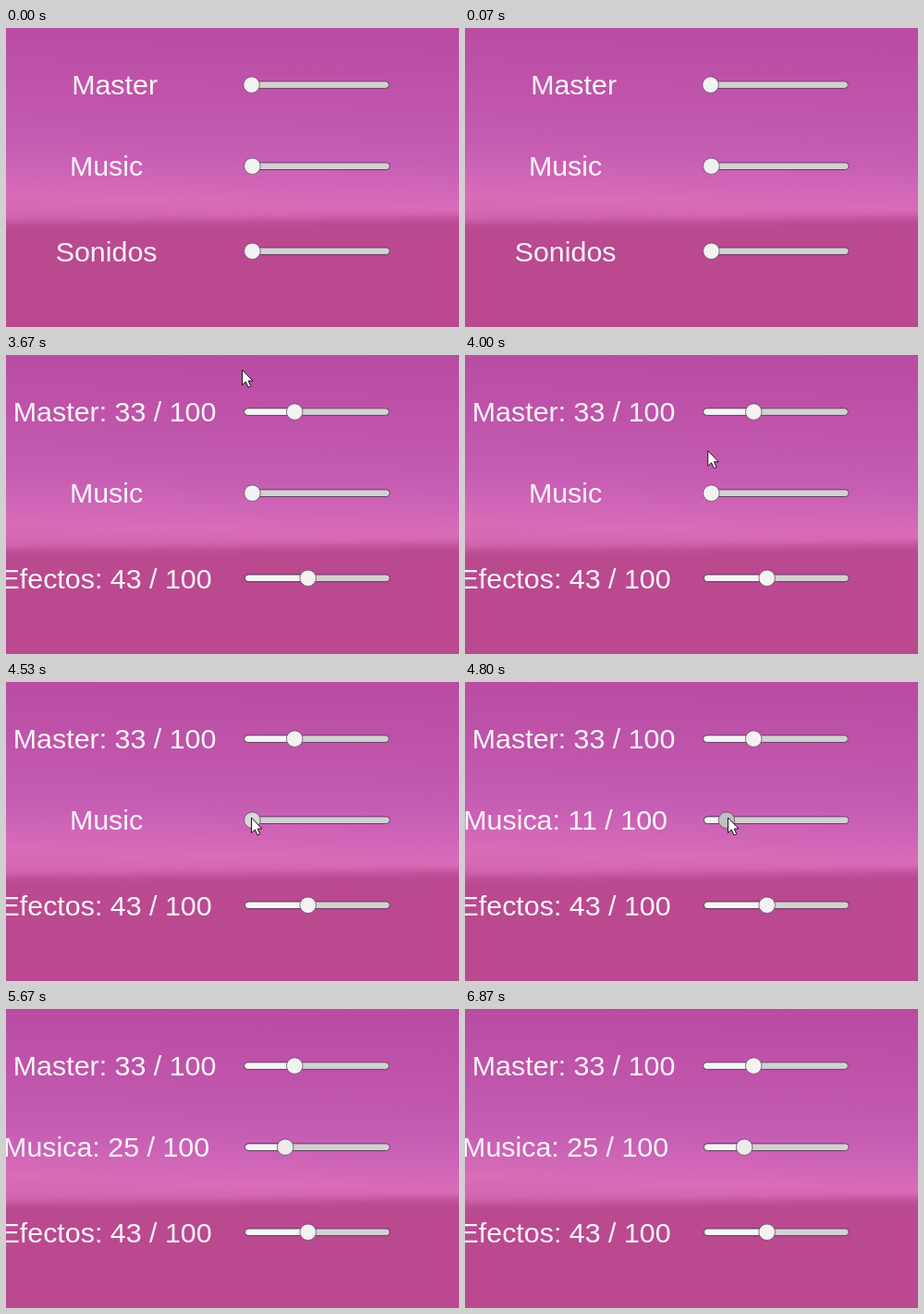
Recreate the animation shown at these times as an HTML page. Size 490 px wide and 324 px high, loop 8 s.

```html
<!DOCTYPE html>
<html lang="es">
<head>
<meta charset="utf-8">
<title>Volumen</title>
<style>
  html, body { margin: 0; width: 100%; height: 100%; overflow: hidden; background: #ba4990; }
  svg { display: block; width: 490px; height: 324px; }
  text { font: 30.4px "Liberation Sans", Arial, sans-serif; fill: #fdf5fb; text-anchor: middle; white-space: pre; }
  .track { fill: #d3d1d3; stroke: #653c60; }
  .fill { fill: #f6f4f6; stroke: #653c60; }
  .knob { fill: #f2f2f2; stroke: #6d4a69; stroke-width: .8; }
</style>
</head>
<body>
<svg id="stage" viewBox="0 0 490 324">
  <defs>
    <linearGradient id="sky" gradientUnits="userSpaceOnUse" x1="245" y1="0" x2="239" y2="205">
      <stop offset="0" stop-color="#b94ca2"/>
      <stop offset=".36" stop-color="#bf54aa"/>
      <stop offset=".66" stop-color="#c55db3"/>
      <stop offset=".8" stop-color="#cf65b7"/>
      <stop offset=".92" stop-color="#da6cb8"/>
      <stop offset="1" stop-color="#d468b3"/>
    </linearGradient>
    <filter id="soft" x="-10%" y="-20%" width="120%" height="140%">
      <feGaussianBlur stdDeviation="0 5"/>
    </filter>
  </defs>
  <rect width="490" height="324" fill="url(#sky)"/>
  <path d="M-30 210Q245 209 520 204V360H-30Z" fill="#ba4990" filter="url(#soft)"/>
  <g id="rows"></g>
  <path id="cursor" d="M.5 0V16.5L4.3 13L7 19L9.8 17.8L7.2 12H12Z" fill="#fff" stroke="#1c1018" stroke-linejoin="round"/>
</svg>
<script>
const LOOP = 8000, FPS = 15, SPAN = 139.5;
const el = id => document.getElementById(id);

function add(parent, tag, attrs) {
  const node = document.createElementNS("http://www.w3.org/2000/svg", tag);
  for (const key in attrs) node.setAttribute(key, attrs[key]);
  return parent.appendChild(node);
}

function makeRow(textX, baseline, knobX, y) {
  const rows = el("rows");
  const bar = { x: knobX - 8, y: y - 3.8, height: 7.6, rx: 3.8 };
  const label = add(rows, "text", { x: textX, y: baseline });
  add(rows, "rect", { ...bar, width: 156.8, class: "track" });
  const fill = add(rows, "rect", { ...bar, class: "fill" });
  const knob = add(rows, "circle", { cy: y, r: 8.8, class: "knob" });
  return (value, idle, active, shade = 242) => {
    const x = knobX + value / 100 * SPAN;
    const text = value > 0 ? `${active}: ${Math.floor(value)} / 100` : idle;
    if (label.textContent !== text) label.textContent = text;
    fill.setAttribute("width", x - knobX + 8);
    knob.setAttribute("cx", x);
    knob.style.fill = `rgb(${shade},${shade},${shade})`;
  };
}

const master = makeRow(117.6, 72.3, 265.6, 61.6);
const music = makeRow(108.6, 160.4, 266.4, 149.7);
const effects = makeRow(108.6, 252.5, 266.4, 241.8);

// Keys are [tick, ...values], interpolated linearly and held at the ends.
function at(keys, tick) {
  if (tick <= keys[0][0]) return keys[0].slice(1);
  for (let i = 1; i < keys.length; i++) {
    const [a, b] = [keys[i - 1], keys[i]];
    if (tick <= b[0]) {
      const p = (tick - a[0]) / (b[0] - a[0]);
      return a.slice(1).map((v, j) => v + (b[j + 1] - v) * p);
    }
  }
  return keys[keys.length - 1].slice(1);
}

const dragKeys = [[68, 0], [72, 11.8], [78, 24.4], [79, 25.6]];
const shadeKeys = [[62, 242], [63, 235], [67, 235], [68, 216], [69, 192], [80, 192], [82, 235]];
const pointerKeys = [
  [55, 255, 16], [57, 257, 37], [61, 264, 126], [63, 265, 147], [68, 265, 147],
  [72, 284, 147], [78, 300, 150], [79, 302, 150], [80, 302, 150], [84, 192, 116]
];

function draw(now) {
  const tick = Math.floor((now % LOOP + 5) * FPS / 1000);
  const loaded = tick >= 36;
  master(loaded ? 33.4 : 0, "Master", "Master");
  music(at(dragKeys, tick)[0], "Music", "Musica", at(shadeKeys, tick)[0]);
  effects(loaded ? 43.2 : 0, "Sonidos", "Efectos");

  const [x, y] = at(pointerKeys, tick);
  const cursor = el("cursor");
  cursor.setAttribute("transform", `translate(${x} ${y})`);
  cursor.style.visibility = tick >= 55 && tick < 85 ? "visible" : "hidden";
}

const start = performance.now();
function loop() {
  draw(performance.now() - start);
  requestAnimationFrame(loop);
}
loop();
</script>
</body>
</html>
```
